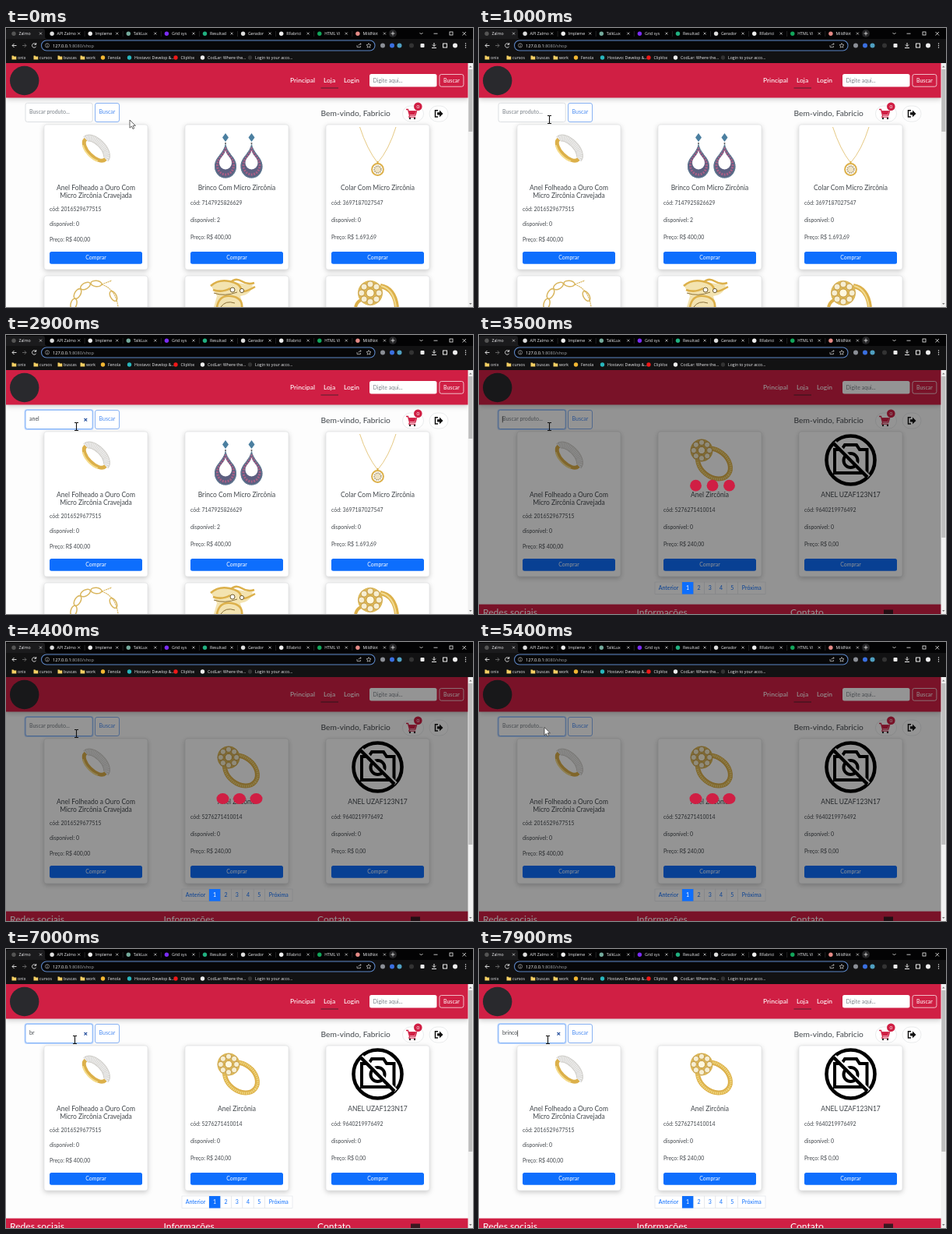
An HTML page for the animation above (8 s loop, 600x358 px).

```html
<!DOCTYPE html>
<html lang="pt-BR">
<head>
<meta charset="utf-8">
<title>Loja</title>
<style>
html, body { margin: 0; width: 100%; height: 100%; overflow: hidden; background: #fdfdfd; }
svg { display: block; width: 600px; height: 358px; font-family: Lato, sans-serif; }
.chrome { font-family: "Open Sans", sans-serif; }
.card { filter: drop-shadow(0 2px 3px rgba(0, 0, 0, .2)); }
</style>
</head>
<body>
<svg id="stage" viewBox="0 0 600 358"></svg>
<script>
const LOOP = 8000;
const RED = '#d01f44', BLUE = '#0d6efd', INK = '#42474c', GREY = '#7b8289', GOLD = '#dcb04a';
const LOADED = 3400, LOAD_END = 5500;

const rect = (x, y, w, h, fill, extra = '') =>
  `<rect x="${x}" y="${y}" width="${w}" height="${h}" fill="${fill}" ${extra}/>`;
const dot = (x, y, r, fill, extra = '') => `<circle cx="${x}" cy="${y}" r="${r}" fill="${fill}" ${extra}/>`;
const line = (d, stroke, width = 1, extra = '') =>
  `<path d="${d}" fill="none" stroke="${stroke}" stroke-width="${width}" ${extra}/>`;
const text = (x, y, size, fill, str, extra = '') =>
  `<text x="${x}" y="${y}" font-size="${size}" fill="${fill}" ${extra}>${str}</text>`;
const MID = 'text-anchor="middle"';
const group = (id, body, extra = '') => `<g id="${id}" ${extra}>${body}</g>`;

function browser() {
  const tabs = [['Zalmo', '#555'], ['API Zalmo', '#ddd'], ['Impleme', '#eee'], ['TalkLux', '#74aa9c'],
    ['Grid sys', '#7a2cf3'], ['Resultad', '#20b080'], ['Gerador', '#ddd'], ['RFabrici', '#eee'],
    ['HTML Vi', '#12a65b'], ['MildNot', '#e58a86']];
  const marks = [[131, 'Fenola', '#f2b632'], [165, 'Hostavo: Develop &amp;...', '#28b6bd'],
    [224.5, 'ClipVox', '#f01818'], [259, 'CodLar: Where the...', '#eee'], [320, 'Login to your acco...', '#333']];
  const folders = [[15, 'onix'], [43, 'cursos'], [74, 'buscas'], [103, 'work']];
  const tools = [[484, '#8b8f96'], [496, '#3a6fe0'], [505.5, '#4f9fc0'], [521, '#333'], [577, '#eee']];
  let out = rect(0, 0, 600, 45, '#030304') +
    '<path d="M0 14V3q0-2 2-2H47q3 0 3 3v7q0 3 3 3Z" fill="#1b1b1d"/>' + rect(0, 14, 600, 31, '#121213');
  tabs.forEach(([name, color], i) => {
    const x = 10 + i * 49.1;
    out += dot(x, 7.2, 2.7, color) + text(x + 6.5, 9, 5.2, '#f0f1f3', name) +
      line(`M${x + 33} 5.6l3 3m0-3l-3 3`, '#e4e4e4', .7);
    if (i) out += line(`M${x + 42} 4v7`, '#444', .5);
  });
  out += dot(497, 7, 5, '#242426') + line('M497 4.5v5m-2.5-2.5h5', '#eee', .8) +
    line('M531.500 6l2 2 2-2M549.500 7.200h5M586.500 5l4.500 4.500m0-4.500l-4.500 4.500', '#eee', .8) +
    rect(570, 5, 4, 4, 'none', 'stroke="#eee" stroke-width=".8"');
  out += line('M13.500 22.500H8m2.500-2.500L8 22.500l2.500 2.500', '#eee', .9) + line('M21 22.500h5m-2.300-2.400l2.300 2.400-2.300 2.400', '#777', .8) +
    line('M38.500 21a2.700 2.700 0 1 0 .1 2.700M38.700 19v2.300h-2.300', '#eee', .9) +
    rect(45.5, 16, 428.5, 13, '#070708', 'rx="6.500" stroke="#5c86c6" stroke-width="1.100"') +
    line('M53 20.200v.8m0 .8v2.500', '#bbb', .7) + dot(53, 22.4, 2.6, 'none', 'stroke="#bbb" stroke-width=".6"') +
    text(60, 24.6, 5.6, '#a0a4a8', '<tspan fill="#fff">127.0.0.1</tspan>:8080/shop') +
    line('M451 22v2.500h4.500V23m-2.500-.5q0-2 3-2m-1-1l1.300 1-1.300 1', '#ccc', .7) +
    line('M466 19.500l.9 2 2.100.2-1.600 1.400.5 2.100-1.900-1.100-1.900 1.100.5-2.100-1.600-1.400 2.100-.2Z', '#ccc', .7);
  tools.forEach(([x, color]) => out += dot(x, 22.5, 3, color));
  out += rect(532.5, 20, 5, 5, '#eee', 'rx="1"') + line('M550 19v4.500m-2-2l2 2 2-2M547 25.500h6', '#eee', 1) +
    rect(561.5, 20, 5, 5, 'none', 'stroke="#eee"');
  [20, 22.5, 25].forEach(y => out += dot(590.5, y, .7, '#eee'));
  folders.forEach(([x, name]) => out += `<path d="M${x - 7.5} 35.5h2l.8 1h3v4h-5.8Z" fill="#f4cf63"/>` +
    text(x, 39.8, 5.2, '#f0f1f3', name));
  marks.forEach(([x, name, color]) => out += dot(x - 6.5, 38, 2.7, color) + text(x, 39.8, 5.2, '#f0f1f3', name));
  return `<g class="chrome">${out}</g>`;
}

function header() {
  const cart = line('M514 104.5h2.5l2 7.7h7.3l1.7-5.4h-10', RED, 1.3) +
    '<path d="M517.3 106.5h9.3l-1.3 4.5h-6.8Z" fill="#d01f44"/>' + line('M518.5 112.2l-.8 2h8.5', RED, 1.1) +
    dot(519, 116, 1.2, '#222') + dot(525, 116, 1.2, '#222');
  const pill = (x, w) => rect(x, 100, w, 20, '#fff', 'rx="10" stroke="#e4e6e8" stroke-width=".8"');
  const nav = (x, label) => text(x, 70, 8.45, '#fff', label, 'font-weight="500"');
  return rect(0, 45, 594, 44.5, RED, 'style="filter:drop-shadow(0 2px 3px rgba(0,0,0,.2))"') +
    dot(23.7, 67.5, 18.7, '#29292d') +
    nav(365, 'Principal') + nav(408, 'Loja') + nav(434, 'Login') + line('M404.5 77h22.5', '#44222b', .9) +
    rect(467, 59, 86.5, 16.5, '#fff', 'rx="2.5"') + text(471.5, 69.8, 7, GREY, 'Digite aqui...') +
    rect(556.9, 59.5, 31, 15.7, 'none', 'rx="2.5" stroke="#fff" stroke-width=".7"') + text(572.4, 69.8, 7, '#fff', 'Buscar', MID) +
    text(404.5, 113.4, 10.25, INK, 'Bem-vindo, Fabricio') +
    pill(509.5, 27) + cart + dot(529.3, 100.7, 5.3, RED) + text(529.3, 103.1, 6.5, '#fff', '0', MID) +
    pill(544, 24) + line('M555 105.7h-3.5v8.3h3.5', '#111', 1.5) +
    '<path d="M554 108.3h3v-2.8l4.5 4.4-4.5 4.4v-2.8h-3Z" fill="#111"/>';
}

function searchBox() {
  return group('ring', rect(23.5, 95, 89, 27, '#bcd6fe', 'rx="3.5"')) +
    rect(25, 96.3, 86.2, 24.2, '#fff', 'id="field" rx="2.5" stroke-width=".8"') +
    text(30, 110.4, 7, GREY, '', 'id="query"') +
    line('M100.5 107l3.6 3.6m0-3.6l-3.6 3.6', '#2d55a0', 1.2, 'id="clear"') +
    line('M0 104.3v8', '#222', .7, 'id="caret"') +
    rect(114.5, 96.5, 31, 24, '#fff', 'rx="2.5" stroke="#6a9ff0" stroke-width=".8"') +
    text(130, 110.4, 7, '#4a8cf2', 'Buscar', MID);
}

/* Jewellery in flat shapes, drawn in stage coordinates. */
const band = () => `<g transform="translate(114.5 156) rotate(45)">
  <ellipse rx="18" ry="9" fill="none" stroke="${GOLD}" stroke-width="5"/>
  <path d="M-15 7A18 9 0 0 0 13 8" fill="none" stroke="#f5dc8b" stroke-width="2"/>
  <path d="M-18 -1A18 9 0 0 1 18 -1" fill="none" stroke="#cfcdc9" stroke-width="9"/>
  <path d="M-18 -1A18 9 0 0 1 18 -1" fill="none" stroke="#efefee" stroke-width="7" stroke-dasharray="1.3 .7"/></g>`;

function earring(x) {
  const drop = (top, w, bottom) => {
    const h = bottom - top, mid = top + h * .66;
    return `M${x} ${top}C${x + w * .2} ${top + h * .3} ${x + w} ${top + h * .38} ${x + w} ${mid}` +
      `A${w} ${h * .34} 0 0 1 ${x - w} ${mid}C${x - w} ${top + h * .38} ${x - w * .2} ${top + h * .3} ${x} ${top}`;
  };
  return `<path d="M${x} 135l4 5.500-4 5.500-4-5.500Z" fill="#4b7fa0"/>` + dot(x, 148, 1, '#555') +
    `<path d="${drop(149, 14, 192.5)}" fill="#5c5f80"/>` +
    line(drop(153, 10.5, 188), '#a95f86', 3, 'stroke-dasharray="2 1.500"') +
    line(drop(149.5, 13.3, 192), '#5e8298', 1.3, 'stroke-dasharray="1.500 .7"') +
    `<path d="${drop(157, 8, 181.5)}" fill="#fff"/>`;
}

const necklace = () => line('M454.500 127Q464 156 477.500 173Q492 156 501 127', '#e3c274', .9) + line('M477.500 171v4', GOLD, 1.8) +
  dot(477.5, 181.5, 7.4, '#fff', `stroke="${GOLD}" stroke-width="2"`) +
  dot(477.5, 181.5, 4.4, '#efe3c4', 'stroke="#a99a78" stroke-width="1.600" stroke-dasharray="1.500 1"');

function flower(x, y, r) {
  let out = dot(x, y, r, '#dcb858');
  for (let i = 0; i < 8; i++) {
    const a = i * Math.PI / 4;
    out += dot(x + Math.cos(a) * r * .7, y + Math.sin(a) * r * .7, r * .25, '#f6eed2', 'stroke="#ba8a2c" stroke-width=".7"');
  }
  return out + dot(x, y, r * .32, '#fff8df', 'stroke="#ba8a2c" stroke-width=".8"');
}

const flowerRing = () => `<g transform="translate(302 165) rotate(38)"><ellipse rx="23" ry="17" fill="none" stroke="${GOLD}" stroke-width="6"/>
  <ellipse rx="23.5" ry="17.5" fill="none" stroke="#f1d77f" stroke-width="3" stroke-dasharray="1.500 1"/></g>` + flower(286, 148, 14.5);

const noPhoto = () => dot(477.5, 160.5, 31, 'none', 'stroke="#000" stroke-width="4.600"') +
  line('M457 147h9l4-6h15l4 6h9.500v30h-41.500Z', '#000', 4) + dot(477.5, 161, 9, 'none', 'stroke="#000" stroke-width="4"') +
  line('M457 137.500L501 181.500', '#fff', 4) + line('M455.500 139L499 182.500', '#000', 4.5);

function bracelet() {
  const link = (x, y, a) => `<ellipse cx="${x}" cy="${y}" rx="7" ry="3.800" transform="rotate(${a} ${x} ${y})" fill="none" stroke="#d9b65f" stroke-width="1.500"/>`;
  return link(87, 354, -75) + link(92, 341, -60) + link(102, 331, -30) + link(116, 328, 5) +
    line('M123 329l13-5m-13 5q18 6 21 29', '#d9b65f', 1.2, 'stroke-dasharray="2 .7"') + link(138, 344, 60);
}

const brooch = () => '<path d="M263 330q14-9 28-4l26 4q-2 12-16 14l4 14h-38l4-14Z" fill="#f3e3b0"/>' +
  line('M263 331q10-9 24-6t15 10 18-3M266 336q12 4 22-2M271 358q3-16 18-14t14 14M289 326q6-6 14-1t16 2', GOLD, 2.6) +
  line('M267 340q14 5 30-1M276 358q6-9 18-5', '#8a7038', 1) +
  dot(291, 336, 3, '#fff', 'stroke="#6e5a2c"') + dot(303, 337, 2.6, '#fff', 'stroke="#6e5a2c"');

const bigRing = () => line('M481 331q18 3 21 27', GOLD, 6) + line('M482 331q16 4 19 27', '#f2da8f', 2) +
  line('M449 358q2-8 10-10', GOLD, 4) + flower(468, 340, 16);

function card(x, y, body) {
  return `<g class="card">${rect(x, y, 133, 186, '#fff', 'rx="3" stroke="#dcdee0" stroke-width=".6"')}</g>${body}`;
}

function product(x, title, code, stock, price, photo) {
  const rows = title.length > 1 ? [234.5, 253.8, 274.4] : [227.4, 249.3, 271.3];
  const info = [`cód: ${code}`, `disponível: ${stock}`, `Preço: R$ ${price}`];
  return card(x, 124, photo + title.map((s, i) => text(x + 66.5, 208.1 + i * 10.2, 8.5, INK, s, MID)).join('') +
    info.map((s, i) => text(x + 7, rows[i], 6.9, INK, s)).join('') +
    rect(x + 7, 287, 119, 15.7, BLUE, 'rx="2.5"') + text(x + 66.5, 297.2, 6.9, '#fff', 'Comprar', MID));
}

function pagination() {
  const edges = [226, 261, 275.3, 289.6, 303.9, 318.2, 332.5, 368];
  return ['Anterior', 1, 2, 3, 4, 5, 'Próxima'].map((s, i) => {
    const w = edges[i + 1] - edges[i];
    return rect(edges[i], 317, w, 15.5, '#fff', 'stroke="#dee2e6" stroke-width=".6"') +
      text(edges[i] + w / 2, 327.3, 7, BLUE, s, MID);
  }).join('');
}

const footer = () => rect(0, 345.6, 594, 13, RED) + text(5, 359.7, 12.1, '#fff', 'Redes sociais') +
  text(202.5, 359.7, 12.1, '#fff', 'Informações') + text(400, 359.7, 12.1, '#fff', 'Contato') + rect(520, 352.5, 12, 6, '#3a1820');

const stage = document.getElementById('stage');
stage.innerHTML = rect(0, 0, 600, 358, '#fdfdfd') +
  product(49, ['Anel Folheado a Ouro Com', 'Micro Zircônia Cravejada'], '2016529677515', 0, '400,00', band()) +
  group('catalog', product(230, ['Brinco Com Micro Zircônia'], '7147925826629', 2, '400,00', earring(282) + earring(315.5)) +
    product(411, ['Colar Com Micro Zircônia'], '3697187027547', 0, '1.693,69', necklace()) +
    card(49, 318, bracelet()) + card(230, 318, brooch()) + card(411, 318, bigRing())) +
  group('results', product(230, ['Anel Zircônia'], '5276271410014', 0, '240,00', flowerRing()) +
    product(411, ['ANEL UZAF123N17'], '9640219976492', 0, '0,00', noPhoto()) + pagination() + footer()) +
  header() + searchBox() +
  rect(0, 45, 594, 313, '#000', 'id="shade" opacity=".42"') +
  group('current', rect(261, 317, 14.3, 15.5, BLUE) + text(268.1, 327.3, 7, '#fff', '1', MID)) +
  group('loader', [278.5, 300, 321.5].map(x => `<ellipse cx="${x}" fill="${RED}"/>`).join('')) +
  rect(593.5, 45, 6.5, 313, '#f1f1f1') + rect(594.3, 53, 5, 80, '#bdbdbd', 'id="thumb"') +
  '<path d="M595 50.500l1.800-2 1.800 2ZM595 353l1.800 2 1.800-2Z" fill="#777"/>' + browser() +
  group('arrow', '<path d="M0 0V10.200L2.400 8 4 11.500 5.700 10.700 4.200 7.300H7.400Z" fill="#fff" stroke="#222" stroke-width=".7"/>') +
  group('ibeam', line('M-2.500-5h1.700q.800 0 .800.800V4.200q0 .800-.800.800h-1.700M2.500-5H.800Q0-5 0-4.200V4.200Q0 5 .800 5h1.700', '#111', 1.1));

const el = Object.fromEntries([...stage.querySelectorAll('[id]')].map(n => [n.id, n]));
const show = (node, on) => node.setAttribute('display', on ? 'inline' : 'none');

const path = [[0, 159, 118], [200, 159, 118], [900, 90.5, 117.5], [4900, 90.5, 117.5],
  [5250, 84, 109.5], [5500, 84, 109.5], [5900, 88.5, 116.5], [LOOP, 88.5, 116.5]];

function pointer(t) {
  const i = path.findIndex(p => p[0] > t);
  const [t0, x0, y0] = path[i - 1], [t1, x1, y1] = path[i];
  const k = (t - t0) / (t1 - t0), e = k * k * (3 - 2 * k);
  return [x0 + (x1 - x0) * e, y0 + (y1 - y0) * e];
}

const typed = (word, t, start, step) => word.slice(0, Math.max(0, Math.floor((t - start) / step) + 1));

function draw(t) {
  const loaded = t >= LOADED, loading = loaded && t < LOAD_END, focused = t >= 1300;
  const word = loaded ? typed('brinco', t, 6700, 200) : typed('anel', t, 1700, 200);

  show(el.catalog, !loaded);
  [el.results, el.current].forEach(n => show(n, loaded));
  [el.shade, el.loader].forEach(n => show(n, loading));
  el.thumb.setAttribute('height', loaded ? 207 : 80);

  show(el.ring, focused);
  el.field.setAttribute('stroke', focused ? '#6da5f5' : '#d3d7db');
  el.query.textContent = word || 'Buscar produto...';
  el.query.setAttribute('fill', word ? INK : GREY);
  show(el.clear, word);
  const blinkStart = loaded ? 3450 : 2300;
  show(el.caret, focused && Math.floor((t - blinkStart) / 500) % 2 === 0);
  el.caret.setAttribute('transform', `translate(${30.3 + (word ? el.query.getComputedTextLength() : 0)} 0)`);

  const lift = Math.abs(Math.sin((t - 5400) / 500 * Math.PI));
  const squash = Math.max(0, 1 - lift * 3);
  for (const ball of el.loader.children) {
    ball.setAttribute('cy', 201.2 - 13.6 * lift);
    ball.setAttribute('rx', 7.4 + .6 * squash);
    ball.setAttribute('ry', 7.4 - .4 * squash);
  }

  const [x, y] = pointer(t);
  const isArrow = x > 111 || (t >= 4900 && t < LOAD_END);
  show(el.arrow, isArrow);
  show(el.ibeam, !isArrow);
  (isArrow ? el.arrow : el.ibeam).setAttribute('transform', `translate(${x} ${y})`);
}

const begin = performance.now();
function tick() {
  draw((performance.now() - begin) % LOOP);
  requestAnimationFrame(tick);
}
tick();
</script>
</body>
</html>
```
